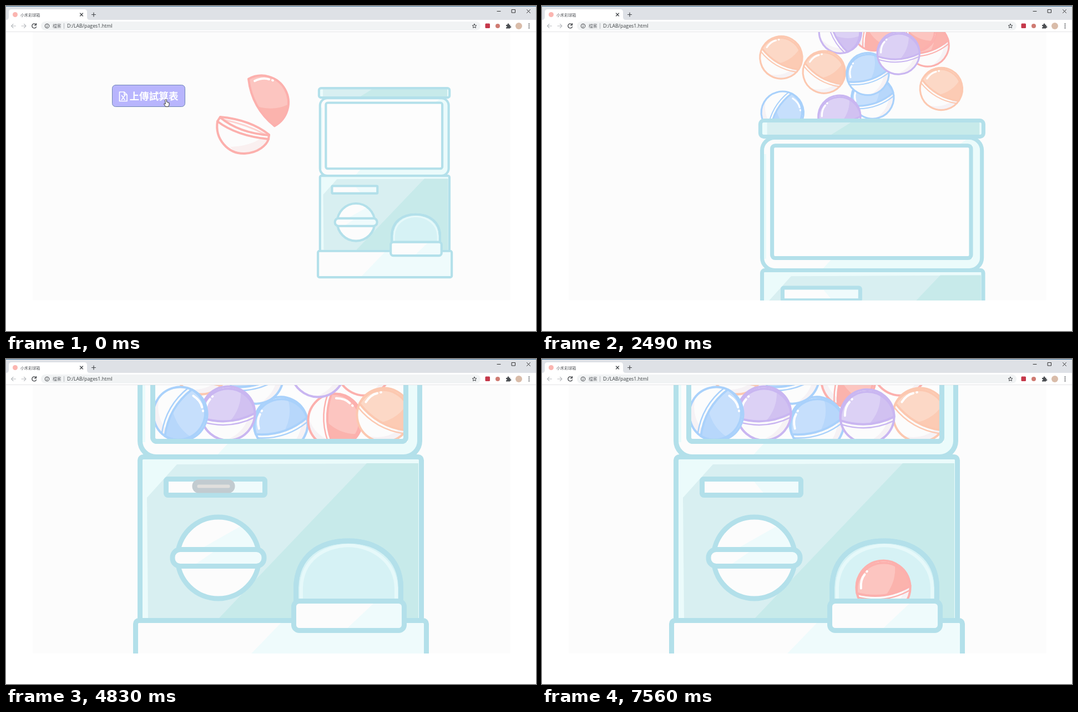
Animation of 955x586 px, one loop 8 s. Source, as an HTML page with a canvas:

```html
<!DOCTYPE html>
<html lang="zh-Hant">
<head>
<meta charset="utf-8">
<title>Capsule machine</title>
<style>
html, body { margin: 0; width: 955px; height: 586px; overflow: hidden; background: #fff; }
canvas { display: block; }
</style>
</head>
<body>
<canvas id="stage" width="955" height="586"></canvas>
<script>
const g = document.getElementById('stage').getContext('2d');
const LOOP = 8000, LINE = '#b3e0ea', PALE = '#ebfbfb', MINT = '#d8eff1', TEAL = '#c7eaea', WHITE = '#fcfcfc';
const SHEEN = '#effbfc';
const CJK = '"Noto Sans CJK TC", "Noto Sans CJK JP", "Noto Sans CJK", sans-serif';

const clamp = v => Math.max(0, Math.min(1, v));
const span = (t, a, b) => clamp((t - a) / (b - a));
const mix = (a, b, k) => a + (b - a) * k;
const smooth = k => k * k * (3 - 2 * k);

const P = d => new Path2D(d);
const poly = (...pts) => P('M' + pts.join(' ') + 'Z');
const disc = (x, y, r) => { const p = new Path2D(); p.arc(x, y, r, 0, 7); return p; };
const rect = (x, y, w, h, r = 0) => { const p = new Path2D(); p.roundRect(x, y, w, h, r); return p; };
const fill = (p, c) => { g.fillStyle = c; g.fill(p); };
const stroke = (p, c, w = 1) => { g.strokeStyle = c; g.lineWidth = w; g.stroke(p); };
function layer(draw, alpha = 1) {
  g.save();
  g.globalAlpha *= alpha;
  draw();
  g.restore();
}
// Filled outline whose shades are clipped to the shape
function shape(path, color, shades = [], width = 9, line = LINE) {
  fill(path, color);
  layer(() => {
    g.clip(path, 'evenodd');
    for (const [c, p] of shades) fill(p, c);
  });
  stroke(path, line, width);
}
function label(s, x, y, font, color) {
  g.font = font;
  g.fillStyle = color;
  g.fillText(s, x, y);
}

// ---- Capsules: line, light and dark tones ----
const TONES = {
  red: ['#fcb0ad', '#fcc5c0', '#fbb3ad'],
  orange: ['#fcc8b0', '#fcd8c6', '#fccbb4'],
  blue: ['#a9d1fb', '#c6dffc', '#b7d7fb'],
  purple: ['#c9b6f1', '#dcd1f5', '#d1c1f1']
};
const DOME = P('M-48.5 4A48.5 48.5 0 0 1 48.5 4Q0 24 -48.5 4Z');
const DOME_SHADE = P('M26 -50Q30 -8 -4 20L60 30V-50Z');
const SEAM = P('M-48 11Q0 30 48 11');
const GLOSS = P('M-40 -4Q-39 -20 -30 -28M-25.5 -32.5l.6 -.5');
const BALL = disc(0, 0, 48.5);
const BALL_SHADE = P('M36 10Q25 38 -8 48L50 60V0Z');

function dome([line, light, dark]) {
  shape(DOME, light, [[dark, DOME_SHADE]], 4, line);
  stroke(GLOSS, '#fff', 4);
}
function ball(tone, x, y, deg) {
  const c = TONES[tone];
  layer(() => {
    g.translate(x, y);
    g.rotate(deg * Math.PI / 180);
    shape(BALL, WHITE, [['#f6f2f5', BALL_SHADE]], 4, c[0]);
    dome(c);
    stroke(SEAM, c[0], 2.5);
  });
}

// tone, resting x and y, tilt, offset part-way through the fall, height of the last hop
const balls = [
  ['red', 498, -41, 108, 0, -338, 2],
  ['red', 645, 17, -18, -24, -360, 29],
  ['orange', 308, -62, 30, -23, -252, 2],
  ['purple', 401, -45, 65, 20, -328, 2],
  ['orange', 352, 15, 30, 32, -296, 20],
  ['blue', 495, 117, -18, 0, -340, 3],
  ['red', 593, 111, 87, 0, -490, 6],
  ['blue', 451, 32, -17, 33, -309, 4],
  ['purple', 400, 98, -5, 19, -277, 21],
  ['blue', 314, 99, 120, -26, -287, 2],
  ['orange', 681, 101, 30, -29, -344, 3],
  ['purple', 562, 20, -4, -8, -345, 3]
];
const [SLIDING, TAKEN, SINKING] = [balls[0], balls[6], balls[11]];

function drawBalls(t) {
  if (t < 2370) return;
  const left = (1 - span(t, 2370, 3030)) ** 3 / .55;
  const up = Math.sin(Math.PI * span(t, 2850, 3030));
  const out = span(t, 7080, 7330) ** 2, shift = smooth(span(t, 7110, 7420));
  for (const b of balls) {
    let [tone, x, y, deg, dx, dy, hop] = b;
    x += dx * left;
    y += dy * left - hop * up;
    if (b == TAKEN) y += 125 * out;
    if (b == SLIDING) { x += 54 * shift; y += 79 * shift; }
    if (b == SINKING) { x += 24 * shift; y += 83.5 * shift; }
    if (b != TAKEN || out < 1) ball(tone, x, y, deg);
  }
}

// ---- Machine ----
const ARCH = P('M522.5 440V412C524 355 565 328 617 328C670 328 711 358 711.5 412V440Z');
const FRAME = rect(264.5, -109.5, 456, 258, 7);
const HOUSING = rect(241.5, -127.5, 504, 304, 29);
const RING = new Path2D(HOUSING);
RING.addPath(FRAME);

function housing() {
  g.fillStyle = WHITE;
  g.fill(RING, 'evenodd');
  layer(() => {
    g.clip(RING, 'evenodd');
    fill(poly(720, -130, 690, -110, 724, -110, 724, 150, 402, 150, 374, 180, 760, 180, 760, -130), PALE);
    fill(rect(240, -90, 11, 240), PALE);
  });
  stroke(RING, LINE, 9);
  shape(rect(237.5, -167, 511.5, 37, 8), MINT, [
    [PALE, rect(237, -167, 16, 40)],
    [TEAL, poly(457, -170, 393, -130, 750, -130, 750, -170)],
    [PALE, rect(740, -167, 6, 40)]
  ]);
}
function knob(t) {
  layer(() => {
    g.translate(382.5, 358.5);
    g.rotate(-2 * Math.PI * smooth(span(t, 6270, 7070)));
    shape(disc(0, 0, 73.5), WHITE, [[SHEEN, poly(42, -58, -32, -16, -55, 0, 74, 0, 74, -58)]]);
    shape(rect(-82.5, -15, 165, 30, 14), WHITE, [[SHEEN, poly(-7, -12, 90, -12, 90, 12, -42, 12)]]);
  });
}
function coin(t) {
  if (t < 4830 || t >= 5970) return;
  const k = smooth(span(t, 5370, 5970));
  layer(() => {
    g.clip(rect(288, 212, 178, 30));
    shape(rect(340, 222 + 28 * k, 68, 15, 7), '#e0dfdd', [], 9, '#c2cbd0');
  }, 1 - k * .5);
}
function sparkle(t) {
  const k = Math.sin(Math.PI * span(t, 6390, 6690));
  if (k <= 0) return;
  layer(() => {
    g.translate(479, 293);
    g.scale(k, k);
    shape(P('M0 -7Q1 -1 5 0Q1 1 0 7Q-1 1 -5 0Q-1 -1 0 -7Z'), '#fff6e6', [], 1, '#f3cfae');
  });
}
function door(t) {
  shape(ARCH, '#d6f2f5', [], 9);
  layer(() => {
    g.clip(ARCH);
    stroke(P('M532 440V412C534 362 572 338 617 336C662 338 701 365 703 412V440'), '#e6f9fa', 6);
    if (t >= 7300) ball('red', 615, mix(270, 412, span(t, 7300, 7530) ** 2), -8);
  });
  stroke(ARCH, LINE, 9);
  shape(rect(518.5, 436.5, 199, 53, 10), WHITE, [[SHEEN, poly(663, 440, 610, 490, 720, 490, 720, 440)]]);
}
function machine(t) {
  fill(FRAME, '#fdfdfd');
  drawBalls(t);
  housing();
  shape(rect(241.5, 176.5, 507, 296, 6), PALE, [
    [MINT, poly(308, 190, 743, 188, 743, 467, 256, 467, 254, 250)],
    [TEAL, poly(650, 188, 743, 188, 743, 467, 384, 467)]
  ]);
  shape(rect(288.5, 216.5, 178, 29, 3), WHITE, [[SHEEN, poly(382, 221, 470, 221, 470, 245, 402, 245)]]);
  coin(t);
  knob(t);
  sparkle(t);
  shape(rect(233.5, 471.5, 524, 103, 6), WHITE, [[SHEEN, poly(500, 471, 390, 585, 760, 585, 760, 471)]]);
  door(t);
}

// Camera: scale, x, y
const FAR = [.46, 454.7, 224.9], MID = [.786, 206.7, 337.8], NEAR = [1, 0, 0];
function camera(t) {
  if (t >= 4830) return NEAR;
  const k = smooth(span(t, 1410, 2010));
  return FAR.map((v, i) => mix(v, MID[i], k));
}

// ---- Page parts ----
function openCapsule() {
  const pink = TONES.red[0];
  layer(() => {
    g.translate(464, 172);
    g.rotate(61 * Math.PI / 180);
    dome(TONES.red);
  });
  shape(P('M381 208C376 240 400 267 430 266C455 265 470 250 473 240L474 232Q440 205 386 200Z'), WHITE,
    [['#faf0f0', P('M404 254Q444 252 462 236L476 240L450 270L415 266Z')]], 4, pink);
  stroke(P('M392 205Q432 213 466 231'), '#fdd3d1', 3);
  stroke(P('M381 208Q415 234 473 240M386 201Q420 229 474 233'), pink, 4);
}
function button() {
  shape(rect(191.5, 142.5, 131, 39, 6), '#b8b5fd', [], 1, '#7087b5');
  stroke(P('M204.5 155h8.5l5 5v11.5h-13.5zM213 155v5h5M208.5 161.5l5.5 7.5M214 161.5l-5.5 7.5'), '#fff', 1.7);
  label('上傳試算表', 222.5, 169, 'bold 17.6px ' + CJK, '#fff');
}
function folder() {
  const line = '#eecdb9', paper = '#fdf0e1';
  shape(rect(238.5, 105, 40, 20, 5), paper, [], 4, line);
  shape(rect(234.5, 115.5, 86.5, 53.5, 3), paper, [], 4, line);
}
function cursor(t) {
  if (t < 30) {
    shape(P('M287 169q1.5 -1.5 2.5 0v4l4.5 1.5v4l-1.5 3h-5l-3 -5q.5 -1.5 2.5 0z'), '#fff', [], 1, '#333');
    return;
  }
  const k = smooth(span(t, 30, 210));
  layer(() => {
    g.translate(mix(288, 209.5, k), mix(169, 94.5, k));
    shape(P('M0 0V10.5l2.5 -2.3l1.7 4l1.7 -.8l-1.7 -3.7h3.3z'), '#fff', [], 1, '#333');
  }, 1 - span(t, 1410, 1700));
}

// ---- Browser frame ----
function browser() {
  const ink = '#45484c', faint = '#b9bcc0';
  fill(rect(0, 0, 955, 47), '#fff');
  fill(rect(0, 0, 955, 25), '#dee1e6');
  fill(rect(0, 0, 955, 1), '#3f7199');
  fill(P('M0 25Q5 25 5 20V11Q5 6 10 6H141Q146 6 146 11V20Q146 25 151 25Z'), '#fff');
  fill(rect(0, 46, 955, 1), '#e3e4e6');
  fill(rect(63, 28, 792, 16, 8), '#f1f3f4');
  fill(disc(16.5, 15.5, 4.5), '#fbb5b0');
  label('小禾彩球箱', 26, 18.5, '7.1px ' + CJK, '#55585c');
  stroke(P('M133.5 13l5 5m0 -5l-5 5M154.5 15.5h7m-3.5 -3.5v7'), ink, 1.2);
  stroke(P('M885 9.5h6M911.5 6.5h6v5.5h-6zM938.5 6.5l6 6m0 -6l-6 6'), '#333', 1);
  stroke(P('M17.5 36h-8m3.5 -3.5l-3.5 3.5l3.5 3.5M28 36h8m-3.5 -3.5l3.5 3.5l-3.5 3.5'), faint, 1.1);
  stroke(P('M54 33.5A4 4 0 1 0 54.5 37.5M54.5 31.5v3h-3'), ink, 1.3);
  stroke(disc(74, 36, 3.8), ink, 1);
  stroke(P('M74 35.5v2.5M74 33.8v.1'), ink, 1);
  label('檔案', 84, 39, '7.8px ' + CJK, '#686b70');
  fill(rect(104, 31, 1, 10), '#b5b8bc');
  label('D:/LAB/pages1.html', 110, 39, '8.8px "Open Sans", "Noto Sans", sans-serif', '#3c4043');
  stroke(P('M844 32.3l1.1 2.5l2.7 .2l-2 1.8l.6 2.7l-2.4 -1.4l-2.4 1.4l.6 -2.7l-2 -1.8l2.7 -.2z'), ink, 1);
  fill(rect(863.5, 31.5, 8.5, 8.5, 1.5), '#c5384a');
  fill(disc(886, 36, 4), '#cf7b72');
  fill(P('M901 34h2.5q-.5 -2.5 1.5 -2.5t1.5 2.5h2v2.5q2 0 2 1.3t-2 1.3v1.4h-7.5v-2q2 -.4 2 -1.3t-2 -1.3z'), '#4a4d51');
  fill(disc(924, 36, 6), '#d9bca9');
  for (const y of [32.5, 36, 39.5]) fill(disc(942.5, y, 1.1), ink);
}

function draw(t) {
  g.lineCap = g.lineJoin = 'round';
  fill(rect(0, 0, 955, 586), '#fff');
  fill(rect(48, 47, 861, 484), WHITE);
  layer(() => {
    g.clip(rect(48, 47, 861, 484));
    layer(() => {
      const [s, x, y] = camera(t);
      g.translate(x, y);
      g.scale(s, s);
      machine(t);
    });
    const gone = 1 - span(t, 1410, 1800), swap = span(t, 30, 210);
    if (gone > 0) {
      layer(openCapsule, gone);
      layer(button, 1 - swap);
      layer(folder, swap * gone);
      cursor(t);
    }
  });
  browser();
}

const start = performance.now();
function tick() {
  draw((performance.now() - start) % LOOP);
  requestAnimationFrame(tick);
}
tick();
</script>
</body>
</html>
```
